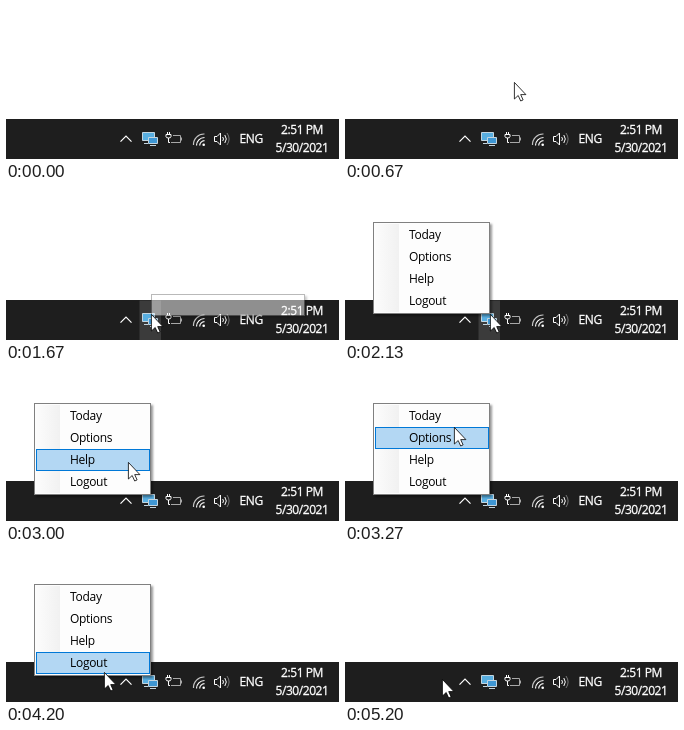
An HTML page for the animation above (5.87 s loop, 333 by 153 pixels).

```html
<!DOCTYPE html>
<html lang="en">
<head>
<meta charset="utf-8">
<title>Tray menu</title>
<style>
  html, body { margin: 0; width: 100%; height: 100%; overflow: hidden; background: #fff; }
  svg { display: block; width: 333px; height: 153px; }
  text { font: 12px "Open Sans", "Noto Sans", sans-serif; letter-spacing: -.3px; }
  .bright { fill: #fff; stroke: #fff; stroke-width: .3; }
  .clock { text-anchor: middle; letter-spacing: -.45px; }
  .line { fill: none; stroke: #fff; }
  .popup { filter: drop-shadow(2px 2px 1px #0006); }
</style>
</head>
<body>
<svg viewBox="0 0 333 153">
  <defs>
    <linearGradient id="gutter">
      <stop stop-color="#fcfcfc"/>
      <stop offset="1" stop-color="#f1f1f1"/>
    </linearGradient>
  </defs>

  <rect y="113" width="333" height="40" fill="#1e1e1e"/>
  <rect id="hover" x="133.500" y="113.500" width="21.500" height="39.500" fill="#3b3b3b"/>

  <path class="line" stroke-width="1.200" d="M114.500 135.700l5.500-5.500 5.500 5.500"/>

  <g id="screens" stroke="#c3d5e0">
    <path fill="#58aee0" d="M136.500 126.500h12v8h-12z"/>
    <path fill="none" d="M138 137.500h4"/>
    <path fill="#3f97d4" d="M142.500 131.500h9v6h-9z"/>
    <path fill="none" d="M144 139.500h6"/>
  </g>

  <g id="battery" class="line">
    <path stroke="#a8a8a8" d="M167 129.500h7.500v7h-9.500M175.500 131.500v3"/>
    <path d="M161.500 126v2.500M163.500 126v2.500M160 128.500h5v2q0 1.500-2.500 1.500t-2.500-1.500zM162.500 132v4.500h1.500"/>
  </g>

  <g id="wifi" class="line" stroke-width="1.200">
    <path d="M187.500 139a10.500 10.500 0 0 1 11-11" stroke="#c4c4c4"/>
    <path d="M190.500 139.500a8 8 0 0 1 8-8M193.700 139.500a4.800 4.800 0 0 1 4.800-4.800"/>
    <circle cx="197.700" cy="138.700" r="1.300" fill="#fff" stroke="none"/>
  </g>

  <g id="speaker" class="line">
    <path d="M208.500 130.500h2.500l3.500-3.500v12l-3.500-3.500h-2.500z"/>
    <path d="M216.700 131q1.600 2 0 4M218.800 129q3 4 0 8"/>
    <path d="M221 127q4.200 6 0 12" stroke="#777"/>
  </g>

  <g class="bright">
    <text x="233.500" y="137">ENG</text>
    <text class="clock" x="296" y="128">2:51 PM</text>
    <text class="clock" x="296" y="146">5/30/2021</text>
  </g>

  <g id="tip" class="popup">
    <rect x="145.500" y="107.500" width="153" height="21" fill="#fff" stroke="#767676"/>
  </g>

  <g id="menu" class="popup">
    <rect x="28.500" y="35.500" width="116" height="91" fill="#fdfdfd" stroke="#808080"/>
    <rect x="30" y="37" width="24" height="88" fill="url(#gutter)"/>
    <rect id="row" x="30.500" width="113" height="21" fill="#b3d7f3" stroke="#0078d7"/>
    <g id="labels"></g>
  </g>

  <path id="cursor" fill="#fff" stroke="#000" stroke-width=".8"
        d="M.4 .4V17l3.800-3.500 2.500 5.500 2.400-1.100-2.400-5.300h5.200z"/>
</svg>
<script>
const LOOP = 5870, FPS = 15, ROW_TOP = 37, ROW_HEIGHT = 22;
const $ = id => document.getElementById(id);
const clamp = v => Math.max(0, Math.min(1, v));

// Cursor stops: step, x, y
const path = [
  [6, 195, 40], [10, 169, 76], [14, 147, 112], [17, 145, 127],
  [39, 145, 127], [41, 140, 121], [45, 122, 94], [48, 111, 62], [50, 107, 55],
  [54, 107, 55], [55, 107, 58], [57, 107, 70], [61, 101, 109], [63, 98, 123],
  [64, 98, 126], [67, 97, 129], [77, 97, 129], [78, 97, 130]
];

["Today", "Options", "Help", "Logout"].forEach((label, i) => {
  const text = document.createElementNS("http://www.w3.org/2000/svg", "text");
  text.setAttribute("x", 64);
  text.setAttribute("y", 52 + i * ROW_HEIGHT);
  text.textContent = label;
  $("labels").append(text);
});

function cursorAt(step) {
  const next = path.findIndex(stop => stop[0] > step);
  if (next < 0) return path[path.length - 1].slice(1);
  if (next === 0) return path[0].slice(1);
  const a = path[next - 1], b = path[next];
  const k = (step - a[0]) / (b[0] - a[0]);
  return [1, 2].map(i => Math.round(a[i] + (b[i] - a[i]) * k));
}

function show(id, opacity) {
  $(id).style.opacity = opacity;
}

function draw(now) {
  const step = Math.floor((now % LOOP + 5) * FPS / 1000);
  const [x, y] = cursorAt(step);
  $("cursor").setAttribute("transform", `translate(${x} ${y})`);
  show("cursor", step >= 6 ? 1 : 0);

  show("hover", clamp((step - 14) / 3) * clamp((43 - step) / 4));
  show("tip", step < 30 ? clamp((step - 23) / 4) : 0);
  show("menu", clamp((step - 29) / 3) * clamp((75 - step) / 2));

  const row = Math.floor((y - ROW_TOP) / ROW_HEIGHT);
  const inside = step >= 40 && x < 144 && row >= 0 && row < 4;
  $("row").setAttribute("y", ROW_TOP + .5 + row * ROW_HEIGHT);
  show("row", inside ? 1 : 0);

  requestAnimationFrame(draw);
}

requestAnimationFrame(draw);
</script>
</body>
</html>
```
